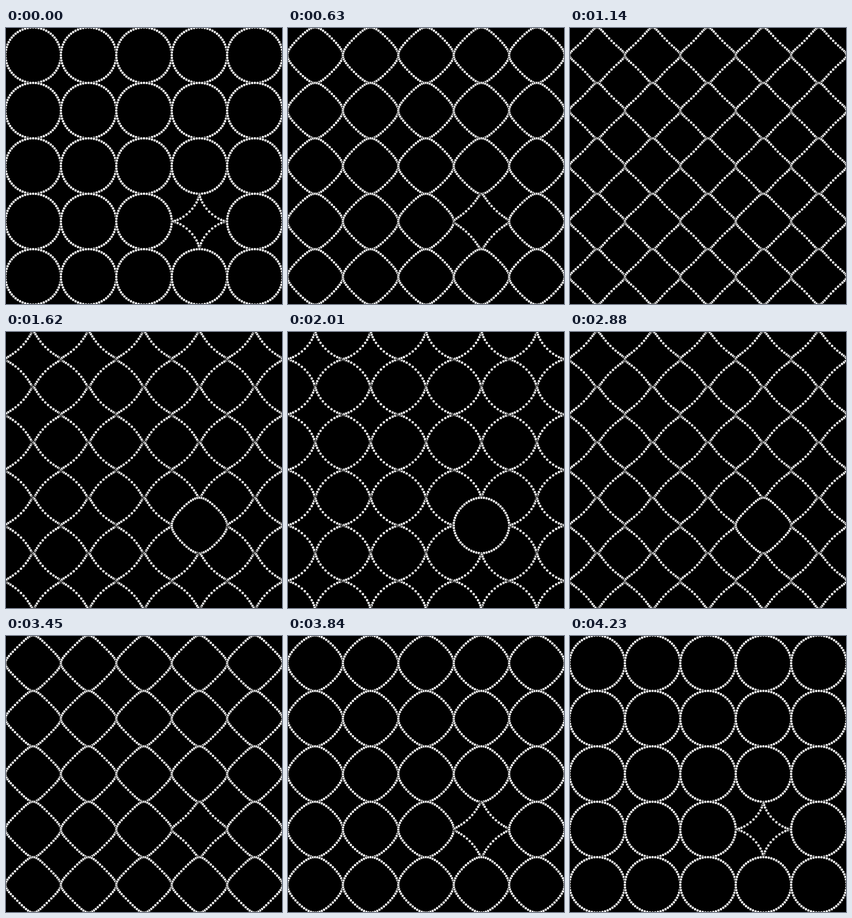
Write an HTML page with a canvas that moves like this. It is 498 px wide and 498 px high and loops after 4.26 s.

```html
<!DOCTYPE html>
<html>
<head>
<meta charset="utf-8">
<style>
  html, body { margin: 0; width: 100%; height: 100%; overflow: hidden; background: #000; }
  canvas { display: block; }
</style>
</head>
<body>
<canvas id="stage" width="498" height="498"></canvas>
<script>
const ctx = document.getElementById('stage').getContext('2d');
const LOOP = 4260, STEP = 30;
const CELLS = 5, PITCH = 100, ORIGIN = 49, RADIUS = 50;
const DOTS = 64, DOT_RADIUS = 2.6;
const ODD_CELL = 3;

function dot(x, y) {
  ctx.beginPath();
  ctx.arc(x, y, DOT_RADIUS, 0, 2 * Math.PI);
  ctx.fill();
  ctx.stroke();
}

// pinch 0 is a circle, pinch 1 is a four-cusped astroid
function ring(cx, cy, pinch) {
  const small = pinch * RADIUS / 4;
  const large = RADIUS - small;
  for (let i = 0; i < DOTS; i++) {
    const a = 2 * Math.PI * i / DOTS;
    dot(cx + large * Math.cos(a) + small * Math.cos(3 * a),
        cy + large * Math.sin(a) - small * Math.sin(3 * a));
  }
}

function draw(time) {
  const phase = Math.floor((time % LOOP) / STEP) * STEP / LOOP;
  const pinch = 1 - Math.abs(1 - 2 * phase);
  ctx.fillStyle = '#000';
  ctx.fillRect(0, 0, 498, 498);
  ctx.fillStyle = '#fff';
  ctx.strokeStyle = '#000';
  ctx.lineWidth = 0.9;
  for (let row = 0; row < CELLS; row++) {
    for (let col = 0; col < CELLS; col++) {
      const odd = row === ODD_CELL && col === ODD_CELL;
      ring(ORIGIN + col * PITCH, ORIGIN + row * PITCH, odd ? 1 - pinch : pinch);
    }
  }
}

const start = performance.now();
function tick() {
  draw(performance.now() - start);
  requestAnimationFrame(tick);
}
tick();
</script>
</body>
</html>
```
